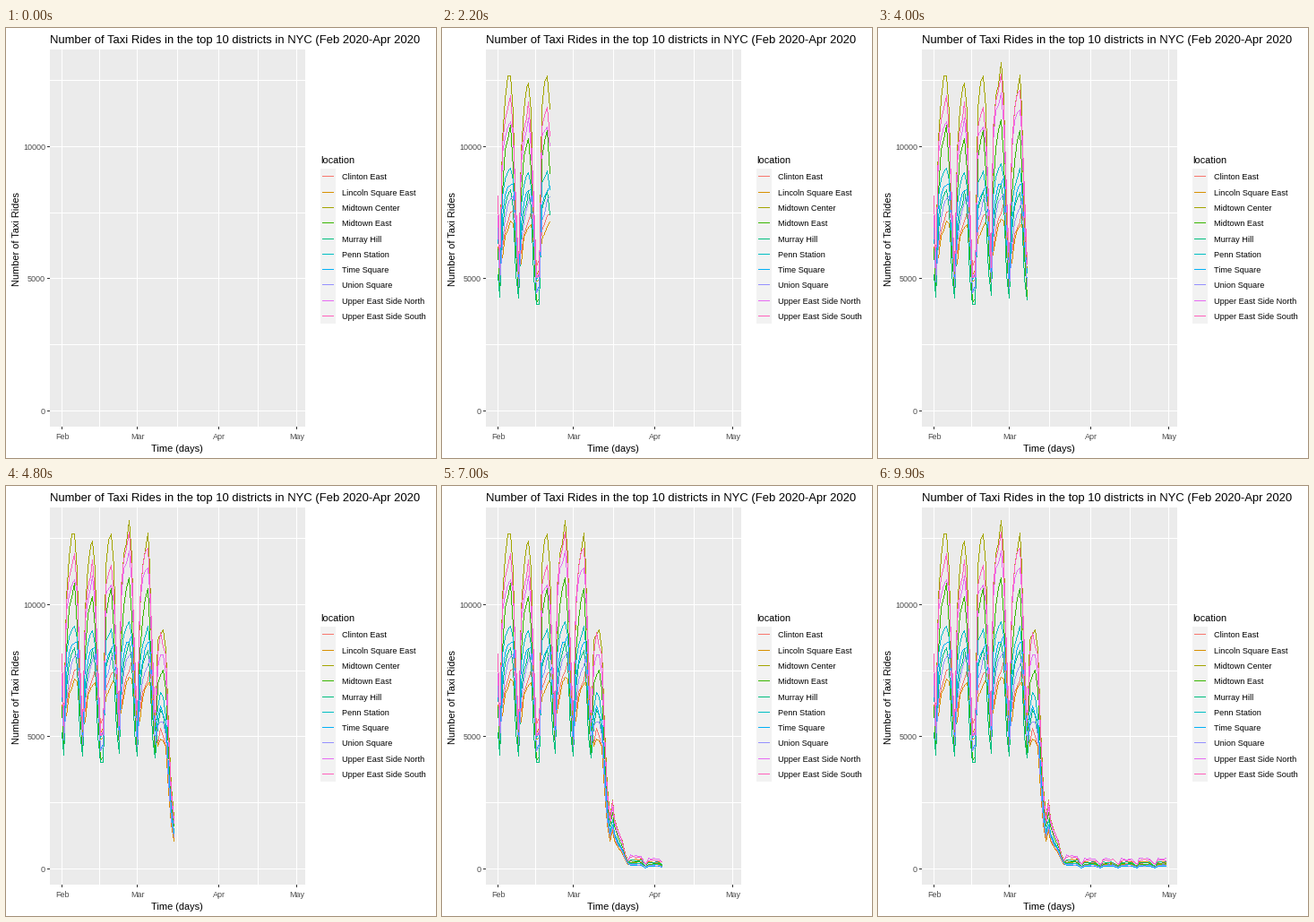
A matplotlib script that plays this animation: 480x480 px, repeating every 10 s.

```python
import numpy as np
import matplotlib.pyplot as plt
from matplotlib.animation import FuncAnimation
from matplotlib.patches import Rectangle

plt.rcParams["font.family"] = ["Liberation Sans", "DejaVu Sans"]

SIZE, DPI = 480, 100
PX = 72 / DPI
FRAMES, DAYS = 100, 90
LEFT, TOP, WIDTH, HEIGHT = 49, 24, 285, 421
BOTTOM = TOP + HEIGHT

# name, colour, rides on Sat, Sun, Mon, Thu, Fri, lockdown level
SERIES = [
    ("Clinton East", "#F8766D", 7100, 5900, 6100, 7400, 7700, 230),
    ("Lincoln Square East", "#D89000", 6300, 5600, 5800, 7100, 7200, 270),
    ("Midtown Center", "#A3A500", 6900, 5300, 10100, 12900, 11500, 180),
    ("Midtown East", "#39B600", 6100, 4500, 8300, 10700, 9300, 200),
    ("Murray Hill", "#00BF7D", 5200, 4300, 6900, 8350, 7700, 260),
    ("Penn Station", "#00BFC4", 6600, 5400, 8000, 9200, 8700, 160),
    ("Time Square", "#00B0F6", 6800, 4900, 7300, 8600, 8700, 110),
    ("Union Square", "#9590FF", 7000, 4800, 6400, 8000, 8200, 130),
    ("Upper East Side North", "#E76BF3", 7500, 5500, 9600, 11100, 10300, 400),
    ("Upper East Side South", "#FF62BC", 8000, 5400, 9900, 11800, 10500, 360),
]
WEEKS = [1, 0.98, 0.98, 1.01, 0.98, 0.97]
HOLIDAY, DROP, QUIET = 16, 37, 51
COLLAPSE = [0.66, 0.705, 0.69, 0.63, 0.42, 0.24, 0.15,
            0.20, 0.15, 0.12, 0.1, 0.08, 0.045, 0.025]


def day_x(day):
    return 62 + day * 2.911


def ride_y(rides):
    return 427.5 - rides * 0.02952


def daily_rides(sat, sun, mon, thu, fri, quiet, rng):
    week = [sat, sun, mon, mon + 0.6 * (thu - mon), mon + 0.84 * (thu - mon), thu, fri]
    uptown = quiet > 300
    rides = np.empty(DAYS)
    for day in range(DAYS):
        wobble = rng.uniform(-1, 1)
        lift = 1.06 if uptown and day > 22 else 1
        if day < DROP:
            value = week[day % 7] * WEEKS[day // 7] * lift
            if day == HOLIDAY:
                value = sun * 0.95
            elif day == HOLIDAY - 1:
                value *= 0.94
            value *= 1 + 0.02 * wobble
        elif day < QUIET:
            value = thu * COLLAPSE[day - DROP] * lift * (1 + 0.03 * wobble)
        else:
            value = quiet * (0.7, 0.45, 1, 1, 1, 1, 1)[day % 7]
            value *= (1.25 if day < QUIET + 5 else 0.95) * (1 + 0.08 * wobble)
        rides[day] = max(value, 50)
    return rides


def trace(xs, ys):
    """Pixels of a jagged, one pixel wide line through the points."""
    xs, ys = np.floor(xs), np.floor(ys)
    steps = np.maximum(abs(np.diff(xs)), abs(np.diff(ys)))
    along = np.append(0, np.cumsum(steps))
    s = np.arange(along[-1] + 1)
    return np.round(np.interp(s, along, xs)), np.round(np.interp(s, along, ys))


fig = plt.figure(figsize=(SIZE / DPI, SIZE / DPI), dpi=DPI, facecolor="white")
ax = fig.add_axes([0, 0, 1, 1])
ax.set_xlim(0, SIZE)
ax.set_ylim(SIZE, 0)
ax.axis("off")


def box(x, y, w, h, color):
    ax.add_patch(Rectangle((x, y), w, h, fc=color, ec="none", lw=0, aa=False, zorder=0))


def label(x, y, text, size, color="black", **kw):
    ax.text(x, y, text, fontsize=size * PX, color=color,
            **{"ha": "left", "va": "baseline", **kw})


box(LEFT, TOP, WIDTH, HEIGHT, "#EBEBEB")

for x in (62, 104, 146, 191, 237, 281, 324):
    box(x, TOP, 1, HEIGHT, "white")
for rides in range(0, 12501, 2500):
    y = int(ride_y(rides))
    box(LEFT, y, WIDTH, 1, "white")
    if rides % 5000 == 0:
        box(LEFT - 3, y, 3, 1, "#333333")
        label(LEFT - 5, y + 4, str(rides), 9, "#4D4D4D", ha="right")
for x, month in zip((62, 146, 237, 324), ("Feb", "Mar", "Apr", "May")):
    box(x, BOTTOM, 1, 3, "#333333")
    label(x + 0.5, 459, month, 9, "#4D4D4D", ha="center")

label(49, 17, "Number of Taxi Rides in the top 10 districts in NYC (Feb 2020-Apr 2020", 13)
label(190.5, 473, "Time (days)", 11, ha="center")
label(17, 235.5, "Number of Taxi Rides", 11, ha="right", va="center", rotation=90)

label(351, 151, "location", 11)
box(351, 157, 17, 173, "#F2F2F2")

rng = np.random.default_rng(7)
days = np.arange(DAYS)
lines = []
for i, (name, color, *levels) in enumerate(SERIES):
    row = int(165.92 + 17.28 * i)
    box(353, row, 13, 1, color)
    label(374.7, row + 4, name, 9.2)
    line, = ax.plot([], [], ls="none", marker=",", color=color, zorder=3)
    lines.append((line, ride_y(daily_rides(*levels, rng))))

# each day lands on a whole frame; the frames left between are interpolated
day_frames = np.round(days * (FRAMES - 1) / (DAYS - 1))


def update(n):
    end = np.interp(n, day_frames, days)
    shown = np.append(days[:int(end) + 1], end)
    for line, ys in lines:
        px, py = trace(day_x(shown), np.interp(shown, days, ys))
        line.set_data(px, py + 1)
        line.set_visible(n > 0)
    return [line for line, _ in lines]


anim = FuncAnimation(fig, update, frames=FRAMES, interval=100, repeat=True,
                     repeat_delay=0, blit=False)
plt.show()
```
